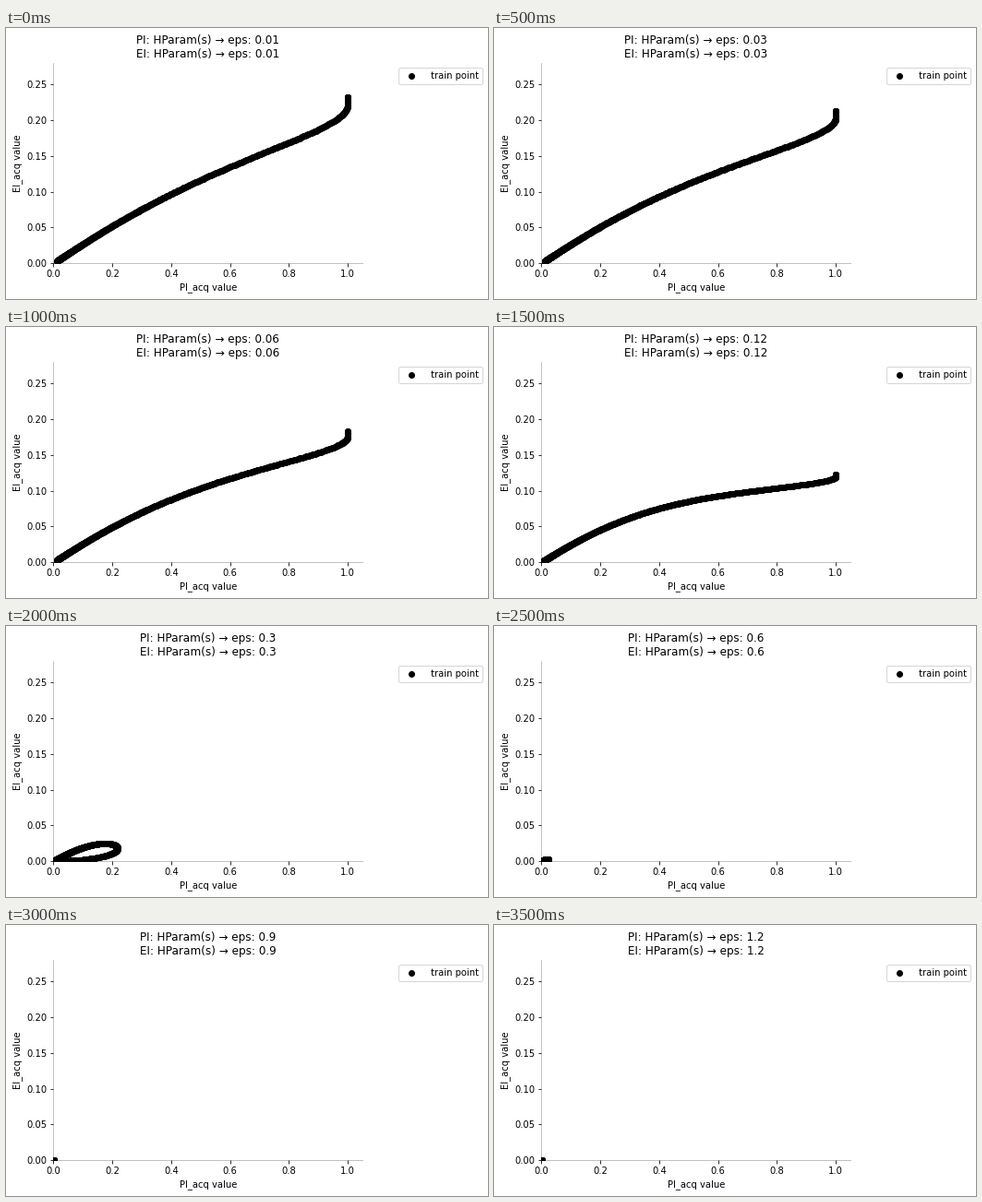
Recreate the animation shown at these times as a matplotlib script. Size 522x294 px, loop 4000 ms.

```python
from math import erf, pi

import matplotlib.pyplot as plt
import numpy as np
from matplotlib.animation import FuncAnimation

DPI = 72
WIDTH, HEIGHT = 522, 294
EPS = [0.01, 0.03, 0.06, 0.12, 0.3, 0.6, 0.9, 1.2]

BEST_GAIN = 0.243  # largest predicted improvement over the best sample
gap = np.linspace(0.02, 1.38, 600) ** 2  # distance below that gain
sigma = np.sqrt(gap * (0.376 - 0.045 * gap))
norm_cdf = np.vectorize(lambda z: 0.5 * (1 + erf(z / 2 ** 0.5)))


def acquisition(eps):
    """Probability of improvement and expected improvement per point."""
    gain = BEST_GAIN - gap - eps
    z = gain / sigma
    prob = norm_cdf(z)
    density = np.exp(-z ** 2 / 2) / np.sqrt(2 * pi)
    return np.column_stack([prob, gain * prob + sigma * density])


plt.rcParams["font.family"] = "DejaVu Sans"
fig = plt.figure(figsize=(WIDTH / DPI, HEIGHT / DPI), dpi=DPI, facecolor="white")
ax = fig.add_axes([51.4 / WIDTH, 38.8 / HEIGHT, 334.8 / WIDTH, 217.44 / HEIGHT])
ax.set_xlim(0, 1.05)
ax.set_ylim(0, 0.28)
ax.set_xlabel("PI_acq value")
ax.set_ylabel("EI_acq value")
for side in ("top", "right"):
    ax.spines[side].set_visible(False)
for side in ("left", "bottom"):
    ax.spines[side].set_alpha(0.3)

points = ax.scatter([], [], s=36, color="black", label=" train point")
title = ax.set_title("")
ax.legend(loc="upper left", bbox_to_anchor=(1.1, 1))


def update(i):
    eps = EPS[i]
    # past 0.9 the cloud rests at the origin
    points.set_offsets(acquisition(min(eps, 0.9)))
    title.set_text("\n".join(f"{name}: HParam(s) → eps: {eps}" for name in ("PI", "EI")))
    return points, title


anim = FuncAnimation(fig, update, frames=len(EPS), interval=500,
                     repeat=True, repeat_delay=0, blit=False)
plt.show()
```
